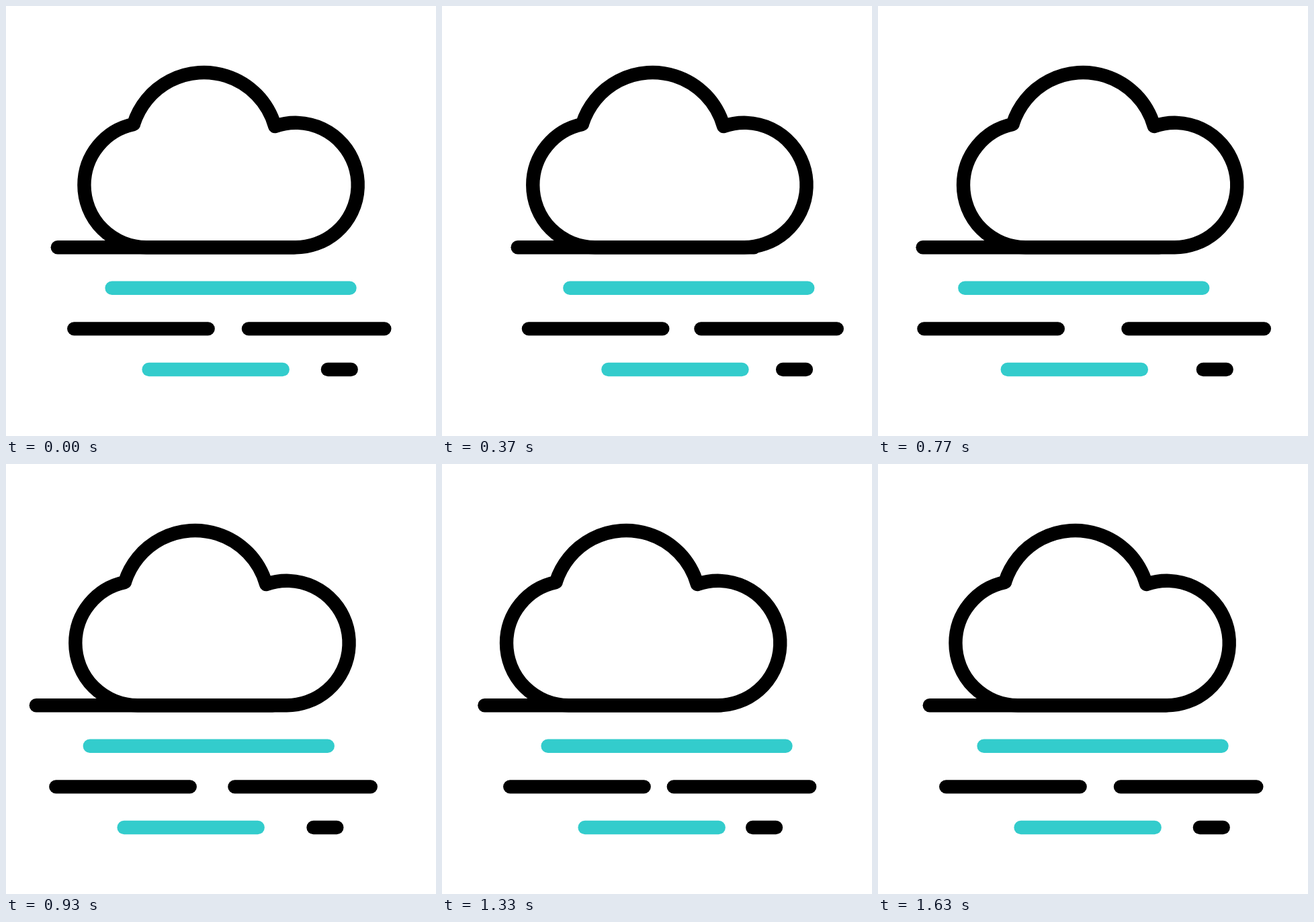
An HTML page with a canvas for the animation above (1670 ms loop, 640 by 640 pixels).

```html
<!DOCTYPE html>
<html lang="en">
<head>
<meta charset="utf-8">
<title>Windy cloud</title>
<style>
  html, body { margin: 0; width: 100%; height: 100%; overflow: hidden; background: #fff; }
  canvas { display: block; width: 100%; height: 100%; }
</style>
</head>
<body>
<canvas id="stage" width="640" height="640"></canvas>
<script>
const ctx = document.getElementById('stage').getContext('2d');
const LOOP = 1670, STEP = 100 / 3;
const BLACK = '#000', TEAL = '#33cccc';
const EASE = [1 / 3, 0, 2 / 3, 1];
const LINEAR = [1 / 3, 1 / 3, 2 / 3, 2 / 3];

// Each part drifts right by `reach`, swings to the left, then returns.
// `keys` holds the steps of the right peak, the left peak and the return.
const cloud = { reach: 28.25, keys: [16.5, 33, 49.5], swing: [1 / 3, 0, 0.75, 1], back: [1 / 3, 0, 0.833, 0.833] };
const bars = [
  { y: 359.2, from: 76.8, to: 428.6, color: BLACK, reach: 37.5, keys: [11.5, 31, 45], swing: [0.25, 0, 0.72, 1] },
  { y: 419.8, from: 157.6, to: 511.5, color: TEAL, reach: 36.7, keys: [8.4, 26.9, 37.2] },
  { y: 480.4, from: 101.3, to: 300.6, color: BLACK, reach: 36.7, keys: [6.9, 25.6, 34.6] },
  { y: 480.4, from: 361, to: 563.3, color: BLACK, reach: 36.7, keys: [16.5, 33, 45.5] },
  { y: 541, from: 212.6, to: 411.7, color: TEAL, reach: 37, keys: [11.7, 28, 38.2], swing: [0.53, 0, 0.59, 1] },
  { y: 541, from: 478.9, to: 513.7, color: BLACK, reach: 36.2, keys: [14.1, 33.7, 45.4] },
];

function cubicBezier([x1, y1, x2, y2], x) {
  const at = (a, b, s) => 3 * a * s * (1 - s) ** 2 + 3 * b * s * s * (1 - s) + s ** 3;
  let low = 0, high = 1;
  for (let i = 0; i < 24; i++) {
    const mid = (low + high) / 2;
    if (at(x1, x2, mid) < x) low = mid; else high = mid;
  }
  return at(y1, y2, low);
}

function shift({ reach, keys: [right, left, home], swing = EASE, back = LINEAR }, step) {
  if (step < right) return reach * step / right;
  if (step < left) return reach * (1 - 2 * cubicBezier(swing, (step - right) / (left - right)));
  if (step < home) return reach * (cubicBezier(back, (step - left) / (home - left)) - 1);
  return 0;
}

function drawCloud(dx) {
  const arc = (x, y, r, start, end) =>
    ctx.arc(x + dx, y, r, start * Math.PI / 180, end * Math.PI / 180);
  ctx.strokeStyle = BLACK;
  ctx.beginPath();
  arc(209, 266.6, 92.6, 90, 258.2);
  arc(294.6, 208.7, 109.7, 197.6, 344);
  arc(431, 266.5, 92.7, 250.6, 450);
  ctx.closePath();
  ctx.stroke();
}

function drawBar({ y, from, to, color }, dx) {
  ctx.strokeStyle = color;
  ctx.beginPath();
  ctx.moveTo(from + dx, y);
  ctx.lineTo(to + dx, y);
  ctx.stroke();
}

function draw() {
  // Steps are 1/30 s, rounded to hundredths of a second.
  const time = Math.floor(performance.now() % LOOP / 10) * 10;
  const step = Math.floor((time + 5) / STEP);
  ctx.fillStyle = '#fff';
  ctx.fillRect(0, 0, 640, 640);
  ctx.lineWidth = 20.4;
  ctx.lineCap = ctx.lineJoin = 'round';
  drawCloud(shift(cloud, step));
  for (const bar of bars) drawBar(bar, shift(bar, step));
  requestAnimationFrame(draw);
}
draw();
</script>
</body>
</html>
```
